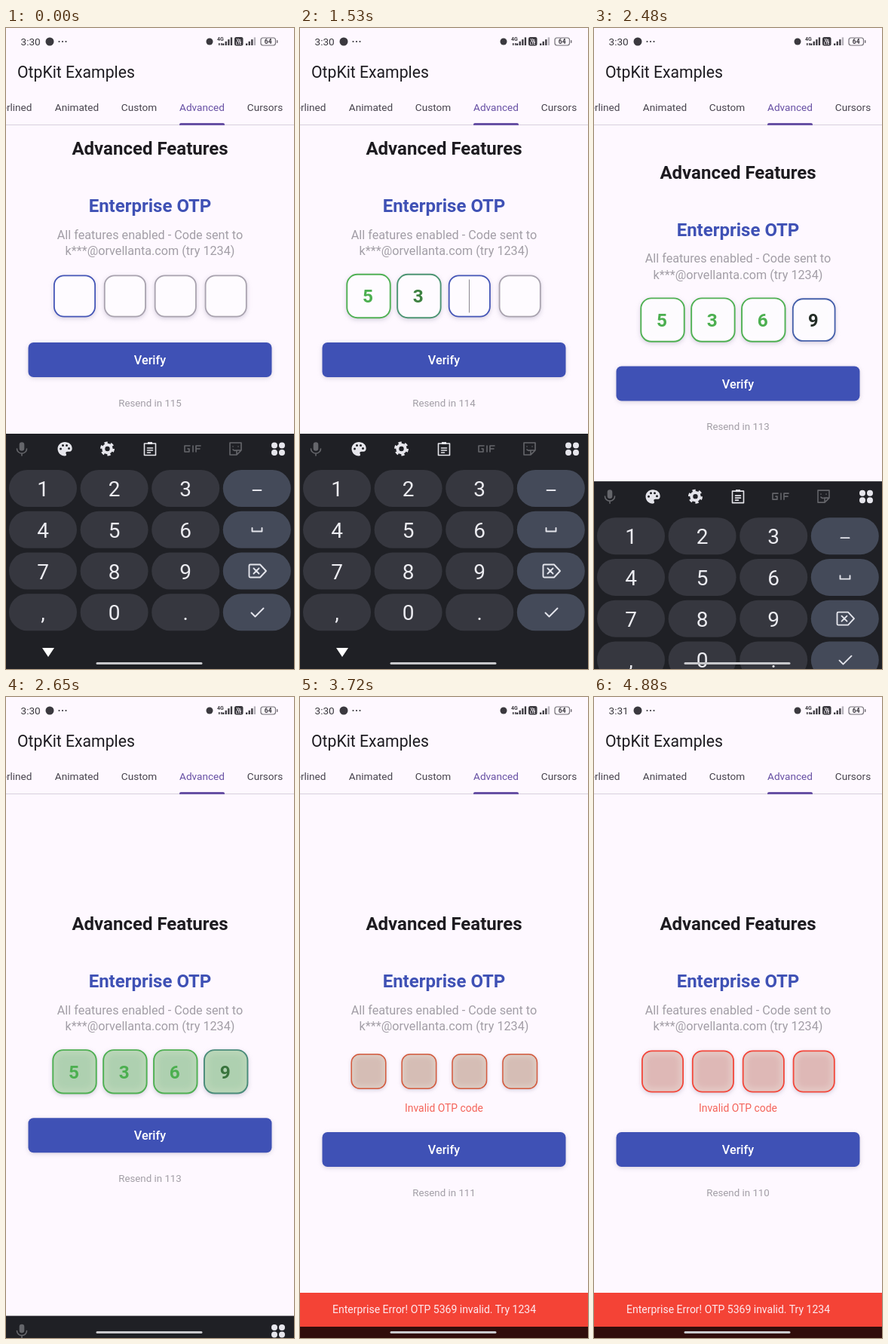
These frames come from a looping animation (382x850 px, 4920 ms). An HTML page:

```html
<!DOCTYPE html>
<html lang="en">
<head>
<meta charset="utf-8">
<title>OTP entry</title>
<style>
  html, body { margin: 0; width: 100%; height: 100%; overflow: hidden; background: #fef8ff; }
  svg { display: block; width: 100%; height: 100%; }
  text { font-family: Roboto, "Open Sans", sans-serif; }
  .mid { text-anchor: middle; }
  .heading { font-size: 24px; font-weight: 700; }
  .tabs { font-size: 13.6px; fill: #49454f; }
  .note { fill: #a29ea6; }
  .line { fill: none; stroke-linecap: round; stroke-linejoin: round; }
</style>
</head>
<body>
<svg viewBox="0 0 382 850" fill="#1d1b20">
  <defs>
    <filter id="soft" x="-30%" y="-30%" width="160%" height="160%"><feGaussianBlur stdDeviation="3"/></filter>
  </defs>
  <rect width="382" height="850" fill="#fef8ff"/>

  <!-- status bar -->
  <g fill="#3b393f">
    <text id="clock" x="19.5" y="22.5" font-size="13.6"></text>
    <circle cx="58" cy="18" r="5.5"/>
    <path class="line" d="M70.500 18h0M75 18h0M79.500 18h0" stroke="#3b393f" stroke-width="2.200"/>
    <circle cx="270" cy="18" r="4.500"/>
    <text x="280" y="17" font-size="7" font-weight="700">4G</text>
    <path d="M282 20h1.500v3h-1.500zM285 20h1.500v3h-1.500z"/>
    <g id="signals"></g>
    <rect x="303" y="12" width="11.500" height="11.500" rx="2.500"/>
    <text class="mid" x="308.700" y="17.500" font-size="5" font-weight="700" fill="#fef8ff">Vo</text>
    <text class="mid" x="308.700" y="22.300" font-size="4.500" font-weight="700" fill="#fef8ff">LTE</text>
    <rect x="338" y="13" width="19.500" height="10" rx="3" fill="none" stroke="#747178" stroke-width="1.200"/>
    <rect x="359" y="16" width="1.500" height="4" rx=".7" fill="#747178"/>
    <text class="mid" x="347.700" y="21.200" font-size="8.500" font-weight="700">64</text>
  </g>

  <!-- app bar and tabs -->
  <text x="15" y="65.500" font-size="21.200">OtpKit Examples</text>
  <g class="tabs">
    <text x="34.500" y="110" text-anchor="end">Underlined</text>
    <text class="mid" x="94" y="110">Animated</text>
    <text class="mid" x="176.500" y="110">Custom</text>
    <text class="mid" x="260" y="110" fill="#6750a4">Advanced</text>
    <text class="mid" x="343.500" y="110">Cursors</text>
  </g>
  <rect y="128" width="382" height="1" fill="#d8d1dd"/>
  <path d="M230 129v-1q0-2 2-2h56q2 0 2 2v1z" fill="#6750a4"/>

  <!-- page content -->
  <g id="content" class="mid">
    <text class="heading" x="191" y="168">Advanced Features</text>
    <text class="heading" x="191" y="244" fill="#3f51b5">Enterprise OTP</text>
    <g class="note" font-size="16.200">
      <text x="191" y="279.500">All features enabled - Code sent to</text>
      <text x="191" y="301">k***@orvellanta.com (try 1234)</text>
    </g>
    <g id="boxes"></g>
    <text id="error" x="191" y="409" font-size="13.900" fill="#f4645a">Invalid OTP code</text>
    <g id="lower">
      <rect x="30" y="419" width="322" height="45" rx="7" fill="#a79fb2" opacity=".5" filter="url(#soft)"/>
      <rect x="29.500" y="417" width="323" height="46" rx="7" fill="#3f51b5"/>
      <text x="191" y="446" font-size="16.200" font-weight="500" fill="#fff">Verify</text>
      <text id="resend" class="note" x="191" y="501.500" font-size="13.300"></text>
    </g>
  </g>

  <g id="snack">
    <rect width="382" height="62" fill="#f44336"/>
    <text x="43" y="26.500" font-size="14" fill="#fdeaf0">Enterprise Error! OTP 5369 invalid. Try 1234</text>
  </g>
  <rect id="strip" y="835" width="382" height="15"/>

  <!-- keyboard -->
  <g id="keyboard">
    <rect y="538" width="382" height="312" fill="#1f2025"/>
    <g class="line" stroke="#65666b" stroke-width="1.600">
      <rect x="18.500" y="550" width="5" height="10" rx="2.500" fill="#65666b"/>
      <path d="M14.500 558a6.500 6 0 0 0 13 0M21 564v3"/>
    </g>
    <g id="tools">
      <g class="line" stroke="#65666b" stroke-width="1.600">
        <path d="M244 554h-7v8h6v-4h-2M248 554v8M258 554h-6v8M252 558h5"/>
        <path d="M312 560v-10h-15v16h9zM306 566v-6h6M301 555h0M308 555h0M301 559q2 2 4 1"/>
      </g>
      <path d="M78 549c-5.500 0-9.500 4-9.500 9s4 9.500 9.500 9.500c2 0 2.500-1.500 1.700-2.800-1-1.700 0-3 1.800-3h2.500c2.500 0 3.700-1.700 3.700-4.200 0-5-4.300-8.500-9.700-8.500z" fill="#e6e6ec"/>
      <path class="line" d="M72.500 558h0M75.500 553.500h0M80.500 553.500h0M83.500 557.500h0" stroke="#1f2025" stroke-width="3"/>
      <g stroke="#e6e6ec" fill="none">
        <circle cx="134.500" cy="558" r="5.200" stroke-width="4"/>
        <circle cx="134.500" cy="558" r="8" stroke-width="3" stroke-dasharray="4.200 4.178"/>
        <path class="line" d="M183.500 551h15v15.500h-15zM187.500 557h7M187.500 560h7M187.500 563h4" stroke-width="1.600"/>
        <path d="M188 550.500h6" stroke-width="3"/>
      </g>
    </g>
    <path d="M356 553.500h0M366 553.500h0M356 563h0M366 563h0" class="line" stroke="#e6e6ec" stroke-width="8"/>
    <g id="keys" class="mid" font-size="28" fill="#ececf1"></g>
    <g class="line" stroke="#e4e5ec" stroke-width="1.900">
      <path d="M327.500 613h11"/>
      <path d="M326.500 663v4.500h13v-4.500"/>
      <path d="M324 711.500h13l8 8.500-8 8.500h-13q-1.500 0-1.500-1.500v-14q0-1.500 1.500-1.500zM328.500 716.500l7 7M335.500 716.500l-7 7"/>
      <path d="M325.500 775.500l5 5 11-11"/>
    </g>
    <path d="M48 822h16l-8 12z" fill="#fff"/>
  </g>
  <rect x="119.500" y="841" width="141" height="3" rx="1.500" fill="#c8c8cc"/>
</svg>

<script>
const LOOP = 4920;
const DIGITS = "5369";
const ENTRY = [690, 1290, 1900, 2440];
const ERROR_AT = 3330;
const IDLE = [166, 160, 172], FOCUS = [63, 81, 181], GREEN = [76, 175, 80], RED = [244, 67, 54];
const INK = [29, 27, 32], WHITE = [254, 251, 255];
// box size over time once the code is rejected
const BOUNCE = [[3300, 1.06], [3390, 1.2], [3720, .84], [3950, 1.03], [4100, 1]];

const $ = id => document.getElementById(id);
const progress = (t, start, length) => Math.min(1, Math.max(0, (t - start) / length));
const easeOut = p => 1 - (1 - p) ** 2;
const mix = (a, b, p) => a.map((v, i) => v + (b[i] - v) * p);
const rgb = c => `rgb(${c.map(Math.round)})`;
const move = (node, y) => node.setAttribute("transform", `translate(0 ${y})`);

function add(parent, tag, attributes, text = "") {
  const node = document.createElementNS("http://www.w3.org/2000/svg", tag);
  for (const name in attributes) node.setAttribute(name, attributes[name]);
  node.textContent = text;
  return parent.appendChild(node);
}

const square = size => ({ x: -size / 2, y: -size / 2, width: size, height: size });

const boxes = [...DIGITS].map((digit, i) => {
  const group = add($("boxes"), "g", {});
  add(group, "rect", { ...square(55), y: -25.5, rx: 13, fill: "#a49cb6", opacity: .5, filter: "url(#soft)" });
  return {
    group,
    x: 91 + 66.9 * i,
    frame: add(group, "rect", { ...square(54.2), rx: 13, "stroke-width": 1.8 }),
    core: add(group, "rect", { ...square(43), rx: 8, filter: "url(#soft)" }),
    cursor: add(group, "rect", { x: -.8, y: -22, width: 1, height: 44, fill: "#8a868f" }),
    digit: add(group, "text", { y: 8.3, x: -1, "font-size": 23, "font-weight": 700 }, digit)
  };
});

["123", "456", "789", ",0."].forEach((row, r) => {
  const y = 586 + 54.75 * r;
  for (let c = 0; c < 4; c++) {
    const x = 4 + 94.6 * c;
    add($("keys"), "rect", { x, y, width: 90, height: 49, rx: 24.5, fill: c < 3 ? "#36373f" : "#444a59" });
    if (c < 3) add($("keys"), "text", { x: x + 45, y: y + 35 }, row[c]);
  }
});

[287, 318].forEach((x, s) => {
  for (let i = 0; i < 4; i++)
    add($("signals"), "rect", {
      x: x + 3.6 * i, y: 20.5 - 2.7 * i, width: 2.3, height: 2.5 + 2.7 * i,
      fill: s && i === 3 ? "#b4b0b8" : "#3b393f"
    });
});

function bounce(t) {
  const next = BOUNCE.findIndex(([time]) => time > t);
  if (next < 0) return 1;
  const [t0, a] = BOUNCE[next - 1], [t1, b] = BOUNCE[next];
  return a + (b - a) * (1 - Math.cos(Math.PI * (t - t0) / (t1 - t0))) / 2;
}

function drawBox(box, i, t) {
  const entered = ENTRY[i];
  const focused = i ? ENTRY[i - 1] : -600;
  const filled = t >= entered;
  const tint = progress(t, entered, 350);
  const failed = progress(t, 3390, 410);
  const complete = progress(t, 2480, 150);

  const border = filled
    ? mix(mix(FOCUS, GREEN, tint), RED, failed)
    : mix(IDLE, FOCUS, progress(t, focused, 150));
  const edge = mix(mix(WHITE, [186, 214, 184], complete), [228, 200, 196], failed);
  const core = mix(mix(WHITE, [174, 208, 176], complete), [222, 184, 182], failed);
  const scale = t < BOUNCE[0][0] ? 1 + .06 * easeOut(progress(t, entered, 150)) : bounce(t);

  box.group.setAttribute("transform", `translate(${box.x} 355.5) scale(${scale})`);
  box.frame.setAttribute("stroke", rgb(border));
  box.frame.setAttribute("fill", rgb(edge));
  box.core.setAttribute("fill", rgb(core));
  box.digit.setAttribute("fill", rgb(mix(INK, GREEN, tint)));
  box.digit.setAttribute("opacity", +(filled && t < ERROR_AT));
  const blinkOn = t >= focused && (t - focused) % 1000 < 500;
  box.cursor.setAttribute("opacity", +(!filled && blinkOn));
}

function draw(t) {
  const drop = 312 * easeOut(progress(t, 2450, 290));
  const failed = t >= ERROR_AT;
  const snack = easeOut(progress(t, 3375, 250));

  $("clock").textContent = t < 4320 ? "3:30" : "3:31";
  $("resend").textContent = "Resend in " + (115 - Math.floor((t + 310) / 1000));
  move($("keyboard"), drop);
  $("tools").setAttribute("opacity", 1 - progress(t, 2480, 130));
  move($("content"), Math.min(drop, 301) / 2 - (failed ? 9.5 : 0));
  move($("lower"), failed ? 19 : 0);
  move($("snack"), 850 - 60 * snack);
  $("error").setAttribute("opacity", +failed);
  $("strip").setAttribute("fill", rgb(mix([42, 41, 45], [49, 13, 11], snack)));
  boxes.forEach((box, i) => drawBox(box, i, t));
}

function tick() {
  draw(performance.now() % LOOP);
  requestAnimationFrame(tick);
}
tick();
</script>
</body>
</html>
```
